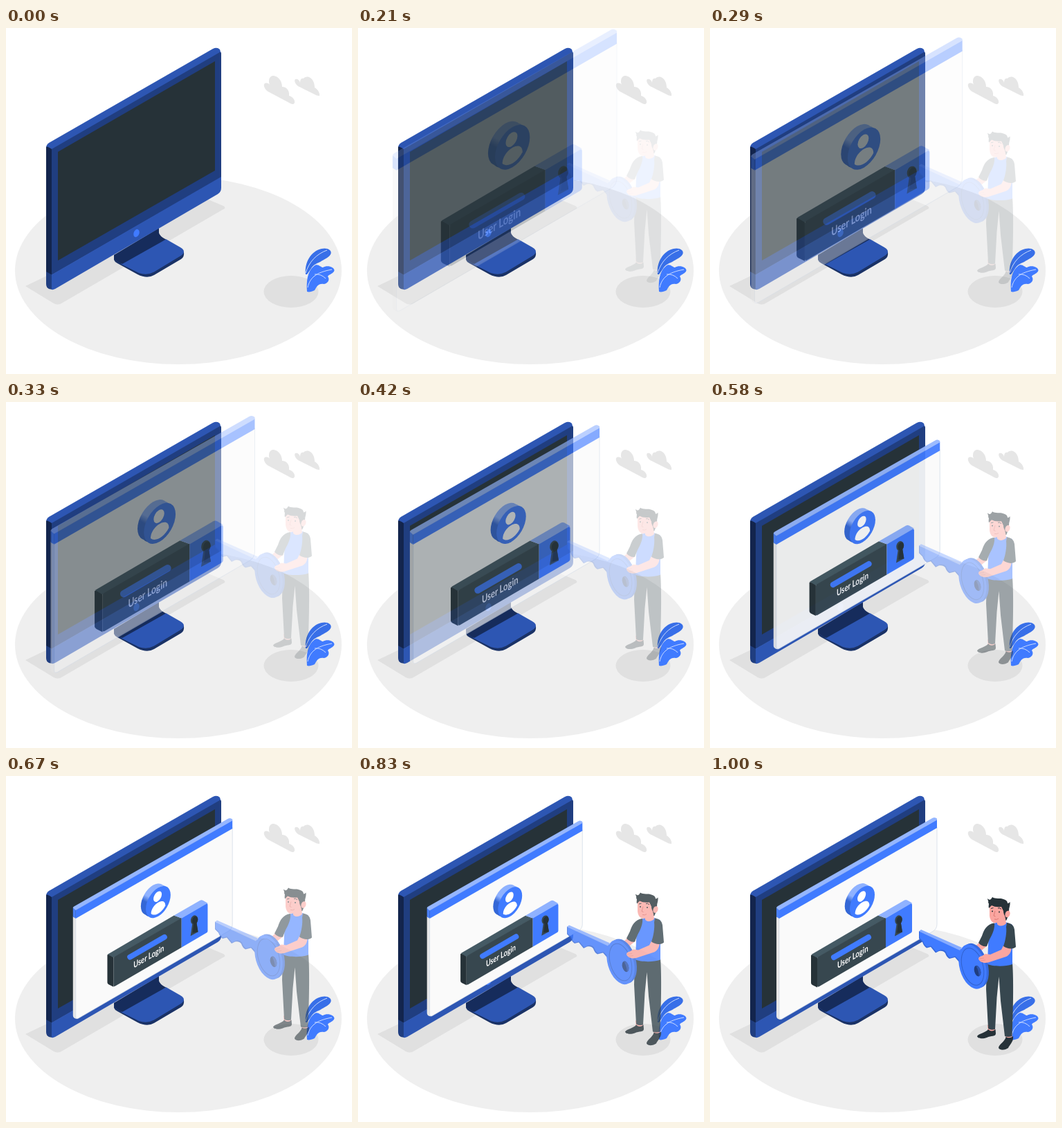
An HTML page for the animation above (1.04 s loop, 500 by 500 pixels).

```html
<!DOCTYPE html>
<html lang="en">
<head>
<meta charset="utf-8">
<title>User login</title>
<style>
  html, body { margin: 0; width: 100%; height: 100%; overflow: hidden; background: #fff; }
  svg { display: block; width: 100%; height: 100%; }
  text { font: 700 13px Lato, "Open Sans", sans-serif; }
</style>
</head>
<body>
<svg viewBox="0 0 500 500">
  <defs>
    <linearGradient id="rim" x1="1" y1="0" x2="0" y2="1">
      <stop offset=".5" stop-color="#8fb2ff"/>
      <stop offset=".62" stop-color="#3467d6"/>
    </linearGradient>
  </defs>

  <ellipse cx="249" cy="350.500" rx="236" ry="135.500" fill="#efefef"/>
  <g fill="#e0e0e0">
    <path d="M28 373L290 247L314 257Q319 260 314 262L80 398Q75 401 69 398Z"/>
    <ellipse cx="412" cy="381" rx="39.500" ry="23"/>
  </g>
  <g fill="#e6e6e6">
    <path d="M374 80C377 79 380 80 381 82C378 74 382 68 387 69C394 70 399 77 399 85C406 85 410 91 409 98C414 99 418 104 417 108C416 111 413 110 411 109L379 92C374 89 371 82 374 80Z"/>
    <path d="M418 74C421 73 424 75 425 79C425 74 427 72 430 73C431 71 435 70 438 71C443 73 446 79 446 86C450 88 454 94 453 98C450 98 448 97 446 96L422 84C418 81 416 76 418 74Z"/>
  </g>

  <g id="monitor">
    <path fill="#1a3266" d="M156 328V335Q157 338 161 340L190 356Q204 363 214 357L253 334Q258 331 257 324L231 306Z"/>
    <path fill="#2d56b3" d="M166 341L231 305L252 317Q262 323 252 329.500L214 352.500Q204 358 192 354Z"/>
    <path fill="#162c5c" d="M156 328L221 289V296Q222 301 231 305.500L168 341L157 334Z"/>
    <path fill="#2d56b3" d="M58 173Q58 169 62 166L299 30Q305 27 309 31L311 38L66 180Z"/>
    <path fill="#13254d" d="M58 172Q59 170 66 175V358H58Z"/>
    <path fill="#203e80" d="M66 175L309 35Q311 34 311 38V216L66 357Z"/>
    <path fill="#203e80" d="M58 352L67 357V378L62 377Q58 375 58 370Z"/>
    <path fill="#2d56b3" d="M66 356.500L311 215V231Q311 237 306 240L71 377Q68 378.500 66 378Z"/>
    <path fill="#263238" d="M75 179L302 48V206L75 336Z"/>
    <ellipse cx="188.500" cy="296.500" rx="4" ry="5.800" fill="#407bff" transform="rotate(20 188.500 296.500)"/>
  </g>

  <g id="plant" fill="#407bff">
    <path fill="#386fe8" d="M433 356C431 339 441 322 456 319C464 317 471 321 469.500 326C468 331 460 334 454 338C448 341 445 341 440 349L435 356Z"/>
    <path d="M435 381C434 367 435 352 445 344C450 339 455 346 458 346C464 342 474 345 474.500 350C474 355 466 356 465 359C469 364 464 370 459 370C451 369 449 374 446 379C442 381 438 382 435 381Z"/>
    <path fill="none" stroke="#dce7ff" stroke-width=".9" d="M433 354C438 338 448 327 464 321M436 375C439 361 448 353 471 349M446 356Q455 355 462 362"/>
  </g>

  <g id="panel">
    <path fill="#e6e6e6" d="M96 203L101 205V352Q96 351 96 347Z"/>
    <path fill="#fafafa" stroke="#d3dce8" stroke-width=".8" d="M100 205L328 74V214Q328 221 322 224.500L104 351Q100 353 100 349Z"/>
    <path fill="#4a80f5" d="M96 190L100 193V206L96 203.500Z"/>
    <path fill="#407bff" d="M100 193.500L328 63V75L100 206Z"/>
    <path fill="#95b6ff" d="M96 190.500Q96 189 98 188L322 60.500Q325 59 328 61.500V63.500L100 194Z"/>

    <g id="avatar">
      <g fill="url(#rim)">
        <circle r="20.500" transform="matrix(.866 -.5 0 1 212.500 178)"/>
        <circle r="20.700" transform="matrix(.866 -.5 0 1 216 180)"/>
      </g>
      <g transform="matrix(.866 -.5 0 1 220 182)">
        <circle r="20.800" fill="#407bff"/>
        <circle cx="-1" cy="-8.500" r="7" fill="#fff"/>
        <path fill="#fff" d="M-12 11C-12 -3 12 -3 12 11C6 18.500 -6 18.500 -12 11Z"/>
      </g>
    </g>

    <g id="field">
      <path fill="#263238" d="M146 259Q147 257 155 262V305.500L148 302Q146 301 146 299Z"/>
      <path fill="#455a64" d="M146.500 258L243 201.500L254 205.500L155 263Z"/>
      <path fill="#37474f" d="M155 264Q155 262 157 261L254 205V248L158 304Q155 306 155 303Z"/>
      <path fill="#8fb2ff" d="M243 201.500L281 179.500Q283 178.500 285 179.500L292 183.500L254 205.500Z"/>
      <path fill="#407bff" d="M254 205.500L290 184.500Q292 183.500 292 186V224Q292 226 290 227L254 248Z"/>
      <g fill="#37474f">
        <ellipse cx="272.500" cy="208" rx="5.200" ry="6.800" transform="rotate(15 272.500 208)"/>
        <path d="M270 211L267 231.500L278 225.500L275.500 210Z"/>
      </g>
      <g fill="#263238">
        <ellipse cx="273.500" cy="208.500" rx="4" ry="5.800" transform="rotate(15 273.500 208.500)"/>
        <path d="M272 211L270 227L278 225.500L275.500 210Z"/>
      </g>
      <path stroke="#407bff" stroke-width="8" stroke-linecap="round" d="M179 262L229 233"/>
      <text fill="#fff" transform="matrix(.73 -.42 0 1 184 278.500)">User Login</text>
    </g>
  </g>

  <g id="person">
    <path fill="#fba6a0" d="M401 360H412V370H402ZM427 372H436.500V381H428Z"/>
    <g fill="#263238">
      <path d="M402 366C399 371 388 372 386 376C387 380 395 380 400 378C406 375 413 377 413 372L412.500 366Q407 371 402 366Z"/>
      <path d="M427.500 377C427 383 417 388 417 393C419 397 427 396 431 393C433 388 439 384 438 376Q433 380 427.500 377Z"/>
    </g>
    <path fill="#37474f" d="M400 270L437 270C439 295 438 345 436.500 376Q431 378 426 376L420 325L417.500 290L414.500 320L412 366Q406 368 402 365L399 308Z"/>

    <path fill="#fba6a0" d="M390 240L401 245L386 257L372 262L376 253ZM350 248Q355 245 360 248L364 256L353 252Z"/>
    <path fill="#407bff" d="M404 216C406 213 411 214 414 211L427 211L437 215L437 272C426 276 408 275 401 272L402 244Z"/>
    <path fill="#37474f" d="M411 212.500C400 214 396 222 393 231L388 241C391 245 396 247 400 246L404 236C408 229 412 220 411 212.500Z"/>

    <g id="head">
      <path fill="#263238" d="M422 188L432 186C433 195 431 203 428 209L422 206Z"/>
      <path fill="#fba6a0" d="M404 186V202C405 210 409 213.500 415 212V214C418 218 425 217 428 213L427 206L425 198L422 188Z"/>
      <path fill="#263238" d="M403 191C402 187 404 185 402 183C403 181 401 179 401 177C404 180 406 179 408 175C412 178 420 176 424 178C428 179 430 181 430 184Q432 184 433.500 182C434 188 432 191 431 195L427 203Q424 200 424 195L421 189Q412 190 407 187Z"/>
      <ellipse cx="430" cy="199.500" rx="3.400" ry="5" fill="#fba6a0" transform="rotate(20 430 199.500)"/>
      <path fill="none" stroke="#263238" d="M406 191.500L409.500 190.500M416 191Q419 190 421 192.500"/>
      <g fill="#263238"><circle cx="408" cy="195.500" r="1"/><circle cx="418" cy="196.500" r="1"/></g>
      <path fill="none" stroke="#d9736f" stroke-width=".9" d="M412 195L410 202L412.500 203M411 207Q415 208 417 206"/>
    </g>

    <g id="key">
      <path fill="#3468db" d="M302 224V235L307 240Q309 246 313 248.500L319 247L326 255.500L331 253Q337 252 340 256Q342 262 346 264L354 262L362 271L365 251Z"/>
      <path fill="#407bff" d="M303 225V234L308 239Q310 245 314 247L319.500 245.500L327 254L332 251.500Q338 250 341 254Q343 260 347 262.500L354.500 260.500L363 269V250Z"/>
      <path fill="#86abff" d="M302 224.500L305 222L364 248L361 252Z"/>
      <ellipse cx="383" cy="274" rx="18.500" ry="33" fill="#356ae0" transform="rotate(-16 383 274)"/>
      <g transform="translate(379.500 275.500) rotate(-16)">
        <ellipse rx="18.800" ry="33" fill="#407bff"/>
        <ellipse rx="15" ry="27.500" fill="none" stroke="#3061cd"/>
        <ellipse cx="5" cy="8" rx="4.500" ry="8" fill="#203e80"/>
        <path fill="#2d56b3" d="M5 0Q10 3 9.500 8Q9 15 5 16Q7 8 5 0Z"/>
      </g>
    </g>

    <path fill="#fba6a0" d="M424 245L436 247C435 256 432 259 428 261L402 269.500C396 271 389 269 388 264Q388 261 393 260L398 257L405 258L421 251Z"/>
    <path fill="none" stroke="#e38a86" stroke-width=".7" d="M389 264L396 263M391 267L398 266"/>
    <path fill="#37474f" d="M429 212C436 213 439 216 440 222L442 247C437 251 430 250 424 246C427 238 429 226 428 218Z"/>
  </g>
</svg>
<script>
  const LOOP = 1040, FPS = 24, LEAD = 0.03;
  const panel = document.getElementById('panel');
  const person = document.getElementById('person');

  // CSS-style cubic-bezier easing, solved by bisection
  function bezier(x1, y1, x2, y2) {
    const at = (a, b, s) => 3 * (1 - s) ** 2 * s * a + 3 * (1 - s) * s * s * b + s ** 3;
    return x => {
      let lo = 0, hi = 1;
      for (let i = 0; i < 24; i++) {
        const mid = (lo + hi) / 2;
        if (at(x1, x2, mid) < x) lo = mid; else hi = mid;
      }
      return at(y1, y2, (lo + hi) / 2);
    };
  }
  const overshoot = bezier(0.36, -0.01, 0.5, 1.38);
  const easeIn = bezier(0.42, 0, 1, 1);
  const clamp = v => Math.max(0, Math.min(1, v));

  function draw(ms) {
    const step = Math.floor((ms % LOOP + 4) * FPS / 1000);
    const x = clamp(step / FPS + LEAD);
    const zoom = step ? overshoot(x) : 0;
    const slide = step ? easeIn(x) : 0;
    panel.setAttribute('transform',
      `translate(212 206.5) scale(${1.5 - 0.5 * zoom}) translate(-212 -206.5)`);
    panel.setAttribute('opacity', clamp(zoom));
    person.setAttribute('transform', `translate(0 ${-30 * (1 - slide)})`);
    person.setAttribute('opacity', slide);
  }

  const start = performance.now();
  function tick() {
    draw(performance.now() - start);
    requestAnimationFrame(tick);
  }
  tick();
</script>
</body>
</html>
```
